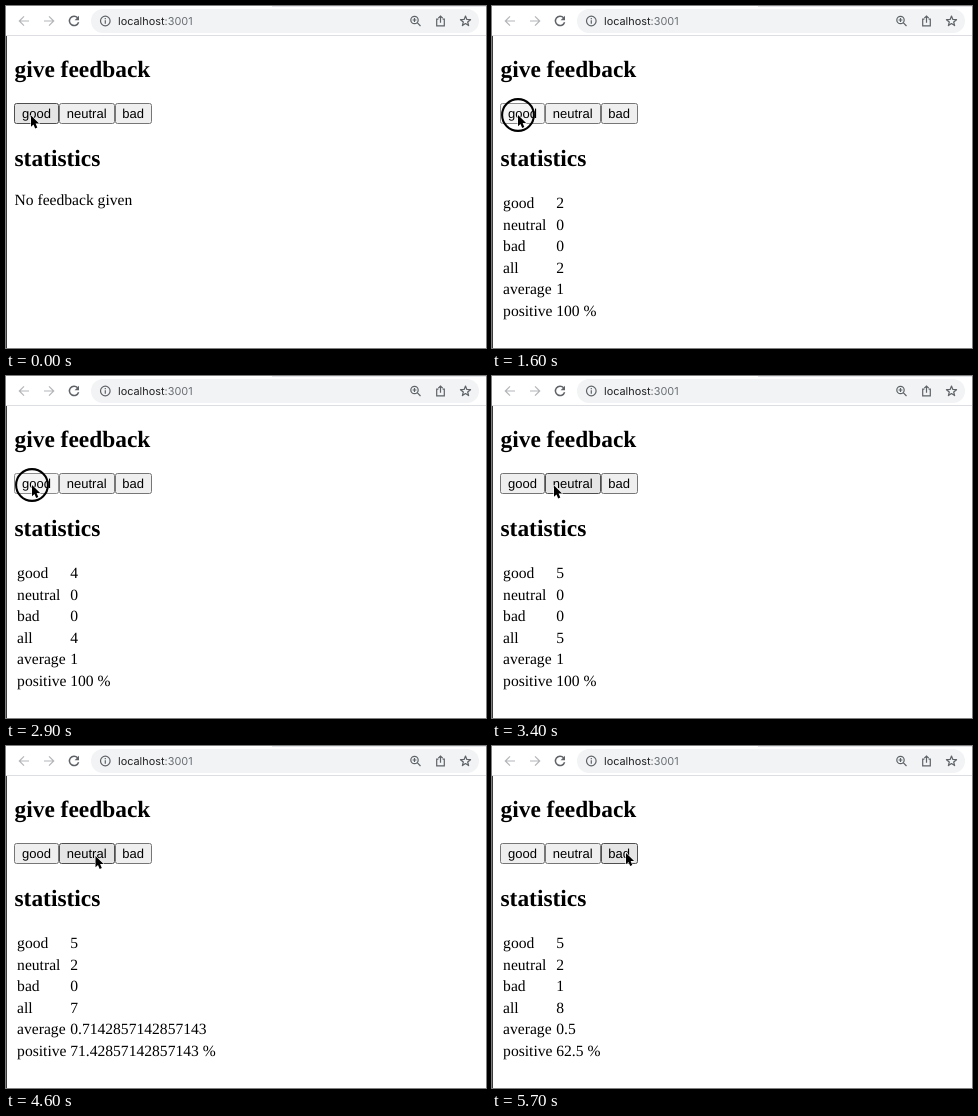
An HTML page for the animation above (6500 ms loop, 480 by 342 pixels).

```html
<!DOCTYPE html>
<html lang="en">
<head>
<meta charset="utf-8">
<title>Feedback</title>
<style>
  html, body { margin: 0; width: 100%; height: 100%; overflow: hidden; background: #fff; }
  svg { display: block; width: 100vw; height: 100vh; }
  text { text-rendering: geometricPrecision; white-space: pre; }
  .page { font: 15.6px "Liberation Serif", Times, serif; }
  .page .head { font-size: 23.4px; font-weight: bold; }
  .label { font: 13px "Liberation Sans", Arial, sans-serif; }
  .url { font: 10.9px Inter, Roboto, sans-serif; fill: #202124; }
  .icon { fill: none; stroke: #5f6368; stroke-width: 1.2; }
  .off { stroke: #b4b6b9; }
</style>
</head>
<body>
<svg viewBox="0 0 480 342" xmlns="http://www.w3.org/2000/svg">
  <rect width="480" height="342" fill="#fff"/>
  <rect x="266" width="214" height="1" fill="#e3e5e8"/>
  <rect y="29" width="480" height="1" fill="#dcdee1"/>
  <rect y="30" width="1" height="312" fill="#3c3c3e"/>
  <rect x="85" y="3" width="388" height="24" rx="12" fill="#f1f3f4"/>

  <g class="icon">
    <path class="off" d="M23 15H13.4M18 10.3L13.3 15L18 19.7"/>
    <path class="off" d="M38 15H47.6M43 10.3L47.7 15L43 19.7"/>
    <path d="M71.6 11.7A4.7 4.7 0 1 0 72.6 16.3" stroke-width="1.5"/>
    <path d="M73 9.8V14.2H68.6Z" fill="#5f6368" stroke="none"/>
    <circle cx="99.3" cy="15" r="4.8"/>
    <path d="M99.3 14.3V17.7M99.3 12.1V13.3"/>
    <circle cx="408.5" cy="14" r="3.7"/>
    <path d="M411.2 16.7L414.5 20M406.6 14H410.4M408.5 12.1V15.9"/>
    <path d="M432.4 13.2H430.7V19.8H438.3V13.2H436.6M434.5 16.8V10.2M432.3 12.2L434.5 10L436.7 12.2"/>
    <path id="star" stroke-linejoin="round"/>
  </g>
  <text class="url" x="112" y="19">localhost<tspan fill="#6b6f74">:3001</tspan></text>

  <g class="page">
    <text class="head" x="8.5" y="71">give feedback</text>
    <text class="head" x="8.5" y="160">statistics</text>
    <text id="empty" x="8.5" y="199.3">No feedback given</text>
    <g id="table"></g>
  </g>
  <g id="buttons"></g>
  <circle id="ring" r="15.9" fill="none" stroke="#000" stroke-width="2.1"/>
  <path id="cursor" d="M0 0V11.2L2.5 8.9L4.2 13L6.3 12.1L4.6 8.1H8.1Z" fill="#000"
        stroke="#fff" stroke-width="1.1" stroke-linejoin="round" paint-order="stroke"/>
</svg>
<script>
const LOOP = 6500, STEP = 100;
const byId = id => document.getElementById(id);

function add(parent, tag, attrs, text = '') {
  const el = document.createElementNS('http://www.w3.org/2000/svg', tag);
  for (const key in attrs) el.setAttribute(key, attrs[key]);
  el.textContent = text;
  parent.append(el);
  return el;
}

// time, x, y of the pointer
const path = [
  [0, 25, 109.5], [100, 26, 109],
  [3300, 36, 109], [3400, 62, 109.5], [3500, 82, 110], [3600, 89.5, 110],
  [5000, 106, 110], [5100, 135, 109.5], [5200, 150, 109],
  [5400, 139, 108], [5500, 134, 107]
];

// press, counted, release, button index
const clicks = [
  [200, 300, 400, 0], [1000, 1100, 1100, 0], [1600, 1700, 1700, 0],
  [2000, 2100, 2200, 0], [2900, 3000, 3000, 0],
  [3700, 3800, 3800, 1], [4500, 4600, 4600, 1], [5600, 5700, 5700, 2]
];

const looks = {
  idle: ['#efefef', '#767676'],
  hover: ['#e5e5e5', '#4f4f4f'],
  active: ['#f5f5f5', '#8d8d8d']
};

const buttons = [['good', 8, 53, 16.1], ['neutral', 53, 109, 60.8], ['bad', 109, 146, 116.2]]
  .map(([name, left, right, textX]) => {
    const box = add(byId('buttons'), 'rect',
      { x: left + 0.5, y: 97.5, width: right - left - 1, height: 20, rx: 2 });
    add(byId('buttons'), 'text', { class: 'label', x: textX, y: 111.6 }, name);
    return { box, left, right };
  });

const cells = ['good', 'neutral', 'bad', 'all', 'average', 'positive'].map((name, i) => {
  const y = 202 + i * 21.5;
  add(byId('table'), 'text', { x: 11.1, y }, name);
  return add(byId('table'), 'text', { x: 64.2, y });
});

const starPoints = Array.from({ length: 10 }, (_, i) => {
  const r = i % 2 ? 2.3 : 5.3, a = i * Math.PI / 5;
  return `${459.5 + r * Math.sin(a)} ${15.3 - r * Math.cos(a)}`;
});
byId('star').setAttribute('d', `M${starPoints.join('L')}Z`);

const show = (el, on) => el.setAttribute('visibility', on ? 'visible' : 'hidden');

function draw(ms) {
  const t = Math.floor((ms % LOOP) / STEP) * STEP;
  const [, x, y] = path.filter(p => p[0] <= t).pop();
  const pressed = clicks.some(([down, , up]) => t >= down && t < up);

  const counts = [0, 0, 0];
  for (const [, counted, , index] of clicks) if (t >= counted) counts[index]++;
  const [good, neutral, bad] = counts;
  const all = good + neutral + bad;

  show(byId('empty'), !all);
  show(byId('table'), all);
  if (all) {
    const values = [...counts, all, (good - bad) / all, `${good / all * 100} %`];
    cells.forEach((cell, i) => { cell.textContent = values[i]; });
  }

  for (const { box, left, right } of buttons) {
    const over = x >= left && x < right;
    const [fill, stroke] = looks[over ? (pressed ? 'active' : 'hover') : 'idle'];
    box.setAttribute('fill', fill);
    box.setAttribute('stroke', stroke);
  }

  const place = `translate(${x} ${y})`;
  byId('ring').setAttribute('transform', place);
  byId('cursor').setAttribute('transform', place);
  show(byId('ring'), pressed);
}

const start = performance.now();
function tick() {
  draw(performance.now() - start);
  requestAnimationFrame(tick);
}
tick();
</script>
</body>
</html>
```
